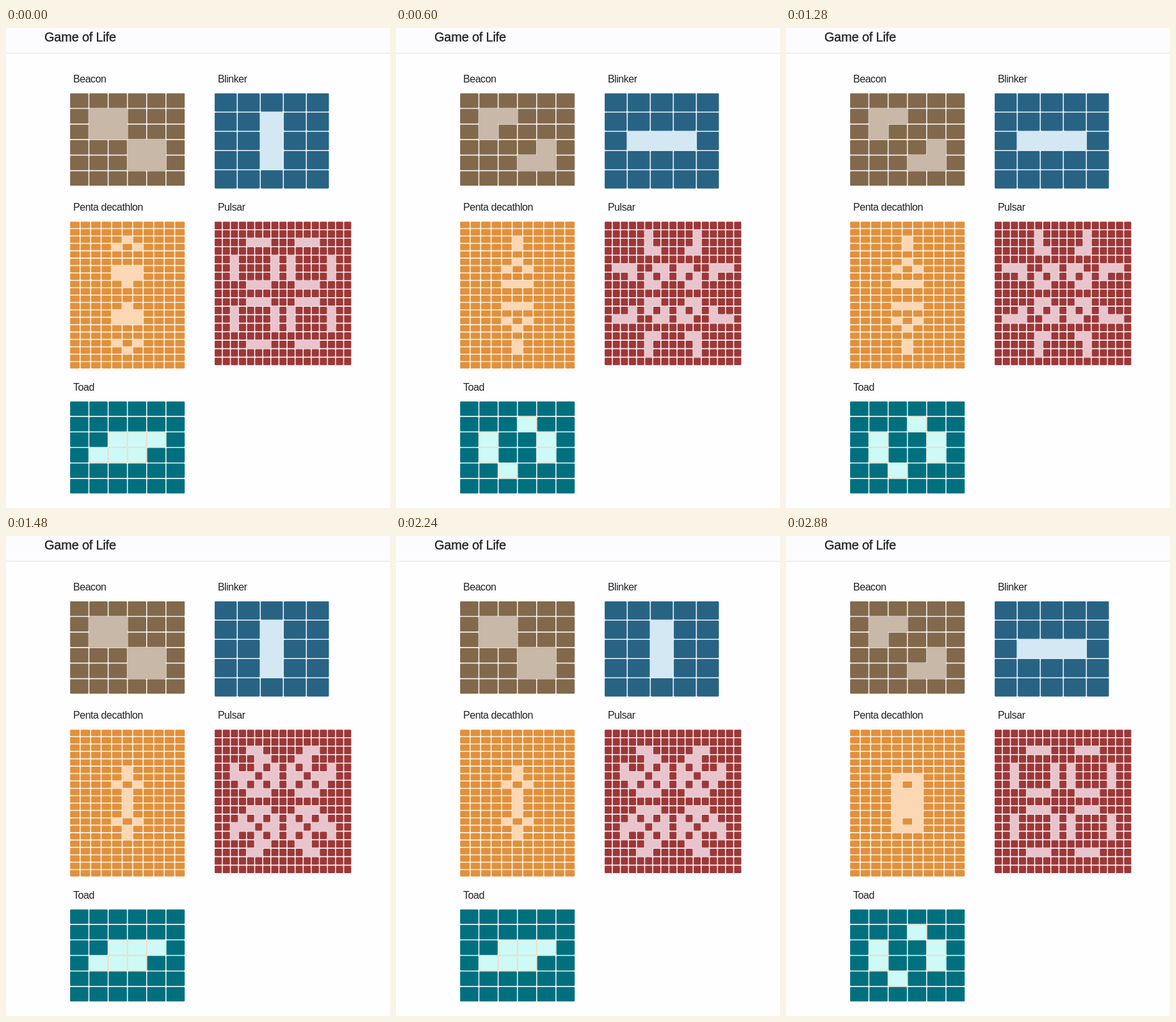
Recreate the animation shown at these times as an HTML page. Size 600 by 749 pixels, loop 2.92 s.

```html
<!DOCTYPE html>
<html lang="en">
<head>
<meta charset="utf-8">
<title>Game of Life</title>
<style>
  html, body { margin: 0; width: 100%; height: 100%; overflow: hidden; background: #fefdff; }
  svg { display: block; width: 600px; height: 749px; }
  text { font-family: "Liberation Sans", Arial, sans-serif; fill: #222; }
  .title { font-size: 20px; letter-spacing: -.22px; stroke: #222; stroke-width: .35px; }
  .label { font-size: 16px; letter-spacing: -.45px; }
</style>
</head>
<body>
<svg id="stage" viewBox="0 0 600 749">
  <rect width="600" height="39" fill="#fcfbfe"/>
  <rect y="39" width="600" height="1" fill="#e5e4e9"/>
  <text class="title" x="60" y="21">Game of Life</text>
</svg>
<script>
const LOOP = 2920;
const STARTS = [0, 600, 1480, 2320]; // when each generation appears
const stage = document.getElementById("stage");

// Pulsar seed: bars of three on four lines, mirrored across the diagonal
const bars = [4, 5, 6, 10, 11, 12];
const pulsar = [2, 7, 9, 14].flatMap(a => bars.flatMap(b => [[a, b], [b, a]]));

// Penta decathlon seed: upper half, mirrored to the lower half
const half = [[2, 5], [3, 4], [3, 6], [6, 4], [6, 5], [6, 6], [7, 4], [7, 5], [7, 6], [8, 5]];
const penta = half.concat(half.map(([r, c]) => [19 - r, c]));

const boards = [
  { name: "Beacon", x: 99.4, y: 101.3, w: 180.6, h: 145.6, rows: 6, cols: 6,
    dead: "#82694c", live: "#c8b8a8", gap: "#f3efea",
    seed: [[1, 1], [1, 2], [2, 1], [2, 2], [3, 3], [3, 4], [4, 3], [4, 4]] },
  { name: "Blinker", x: 325.3, y: 101.2, w: 180, h: 150, rows: 5, cols: 5,
    dead: "#286384", live: "#d3e8f3", gap: "#eaf4fa",
    seed: [[1, 2], [2, 2], [3, 2]] },
  { name: "Penta decathlon", x: 99.4, y: 301.5, w: 180.6, h: 230.5, rows: 20, cols: 11,
    dead: "#e1913c", live: "#fbd7b3", gap: "#fdf1e2", seed: penta },
  { name: "Pulsar", x: 325.3, y: 301.5, w: 214.9, h: 225.4, rows: 17, cols: 17,
    dead: "#9d3838", live: "#e8c4cc", gap: "#f8eaed", seed: pulsar },
  { name: "Toad", x: 99.4, y: 581.9, w: 180.6, h: 145.2, rows: 6, cols: 6,
    dead: "#00707f", live: "#cdfaf7", gap: "#e6f7f7", edge: "#f0d9bc",
    seed: [[2, 2], [2, 3], [2, 4], [3, 1], [3, 2], [3, 3]] }
];

function add(tag, attrs, text) {
  const el = document.createElementNS("http://www.w3.org/2000/svg", tag);
  for (const key in attrs) el.setAttribute(key, attrs[key]);
  if (text) el.textContent = text;
  return stage.appendChild(el);
}

function evolve(grid) {
  return grid.map((row, r) => row.map((alive, c) => {
    let n = -alive;
    for (let i = r - 1; i <= r + 1; i++)
      for (let j = c - 1; j <= c + 1; j++) n += grid[i]?.[j] || 0;
    return +(n === 3 || (alive && n === 2));
  }));
}

function roundRect(x, y, w, h, r) {
  const arc = (dx, dy) => `a${r} ${r} 0 0 1 ${dx} ${dy}`;
  return `M${x + r} ${y}h${w - 2 * r}${arc(r, r)}v${h - 2 * r}${arc(-r, r)}` +
    `h${2 * r - w}${arc(-r, -r)}v${2 * r - h}${arc(r, -r)}z`;
}

function cells(b, grid, kind, inset, radius) {
  const w = b.w / b.cols, h = b.h / b.rows;
  let d = "";
  grid.forEach((row, r) => row.forEach((alive, c) => {
    if (alive === kind)
      d += roundRect(b.x + c * w + inset, b.y + r * h + inset, w - 2 * inset, h - 2 * inset, radius);
  }));
  return d;
}

for (const b of boards) {
  let grid = Array.from({ length: b.rows }, () => Array(b.cols).fill(0));
  for (const [r, c] of b.seed) grid[r][c] = 1;
  add("text", { class: "label", x: b.x + 5.6, y: b.y < 200 ? 85 : b.y < 500 ? 285 : 566 }, b.name);
  add("rect", { x: b.x + .5, y: b.y + .5, width: b.w - 1, height: b.h - 1, rx: 1.5, fill: b.gap });
  b.deadPath = add("path", { fill: b.dead });
  b.livePath = add("path", { fill: b.live, stroke: b.edge || "none" });
  b.steps = STARTS.map(() => {
    const step = {
      dead: cells(b, grid, 0, .8, 1.3),
      live: cells(b, grid, 1, b.edge ? .4 : -.25, 1.3)
    };
    grid = evolve(grid);
    return step;
  });
}

let shown = -1;
function draw() {
  const t = performance.now() % LOOP;
  const gen = STARTS.filter(s => s <= t).length - 1;
  if (gen !== shown) {
    shown = gen;
    for (const b of boards) {
      b.deadPath.setAttribute("d", b.steps[gen].dead);
      b.livePath.setAttribute("d", b.steps[gen].live);
    }
  }
  requestAnimationFrame(draw);
}
draw();
</script>
</body>
</html>
```
